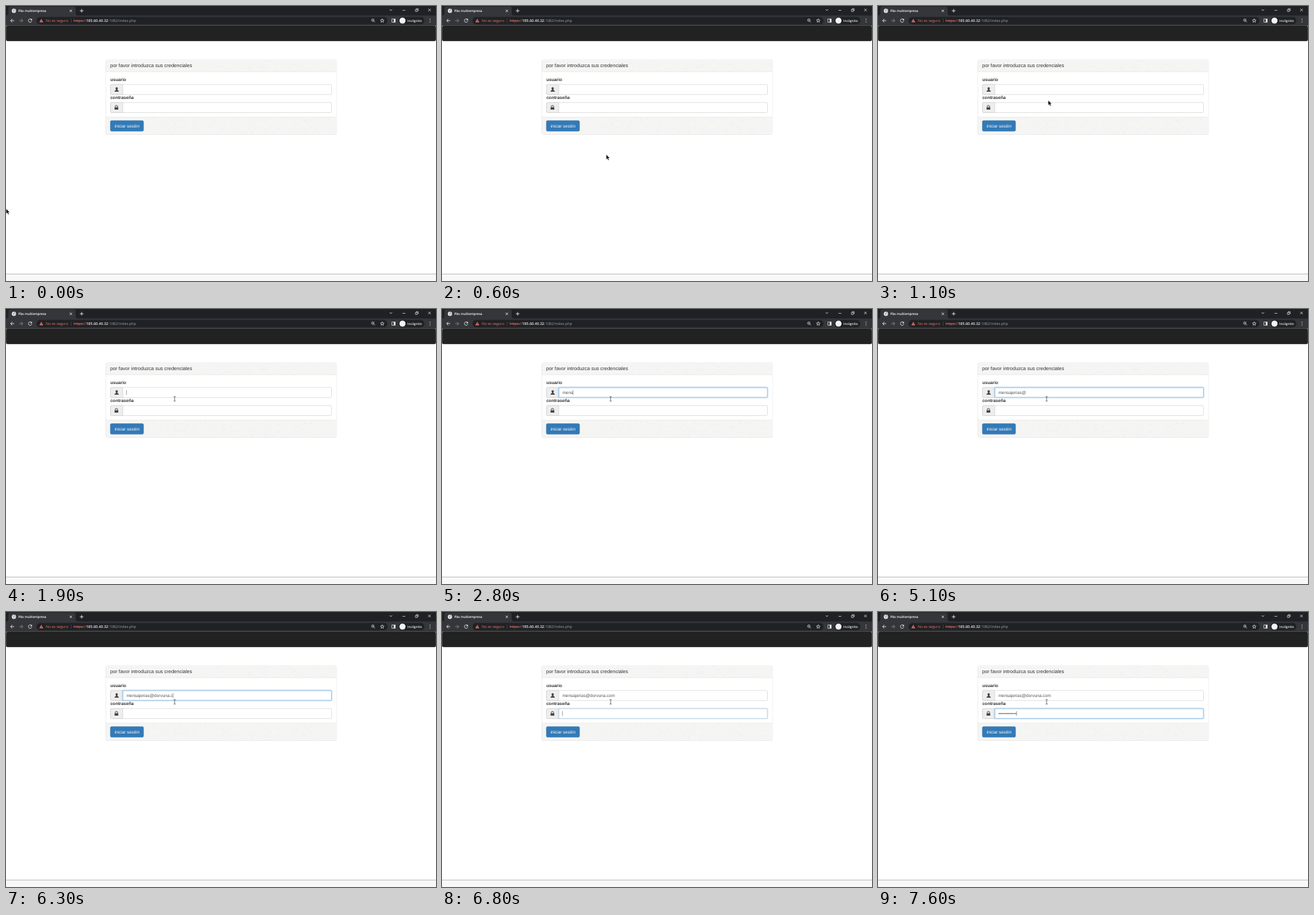
These frames come from a looping animation (648x414 px, 8 s). An HTML page:

```html
<!DOCTYPE html>
<html lang="es">
<head>
<meta charset="utf-8">
<title>Acceso</title>
<style>
  html, body { margin: 0; width: 100%; height: 100%; overflow: hidden; background: #fff; }
  svg { display: block; width: 100%; height: 100%; }
  text { font-family: "Liberation Sans", Arial, sans-serif; font-size: 6.5px; fill: #333; text-rendering: geometricPrecision; white-space: pre; }
  .ui text { font-family: "Open Sans", "Noto Sans", sans-serif; font-size: 5.55px; }
  .icon { fill: none; stroke: #e8eaed; stroke-width: .9; }
  .bold { font-weight: 700; }
  .value { fill: #555; }
</style>
</head>
<body>
<svg viewBox="0 0 648 414" xmlns="http://www.w3.org/2000/svg">
  <defs>
    <clipPath id="bands"><path d="M151 81.5h346.5v17.2H151zM151 167.5h346.5v25.5H151z"/></clipPath>
    <filter id="blur" x="-5%" y="-50%" width="110%" height="200%"><feGaussianBlur stdDeviation="1"/></filter>
    <g id="group">
      <rect x="157.5" width="333" height="15.2" y=".3" rx="1.8" fill="#fff" stroke="#ccc" stroke-width=".6"/>
      <path d="M176 .3h-16.700a1.800 1.800 0 0 0-1.800 1.800v11.600a1.800 1.800 0 0 0 1.800 1.800H176z" fill="#eee" stroke="#ccc" stroke-width=".6"/>
    </g>
  </defs>
  <rect width="648" height="414" fill="#fff"/>

  <g class="ui">
    <rect width="648" height="29.5" fill="#202124"/>
    <path d="M0 14.2C2.5 14.2 3.5 13 3.5 11V4Q3.5.8 7 .8h94.500Q105 .8 105 4v7c0 2 1 3.200 3.500 3.200H648v15.300H0z" fill="#35363a"/>
    <circle cx="12" cy="7.200" r="3.200" fill="#f1f3f4"/>
    <path d="M10 6l1.700 1.500-.5 1.700M12.500 4.600l-.4 1.300 2.200.7M13.400 9.200l.6-1.300" class="icon" style="stroke:#4a4b50;stroke-width:.7"/>
    <text x="18.500" y="9.100" style="font-size:4.8px;fill:#fff;font-weight:600">Pbx multiempresa</text>
    <path class="icon" d="M96 5.600l3.400 3.400m0-3.400L96 9M111.300 7.200h5.400m-2.700-2.700v5.400"/>
    <path class="icon" style="stroke-width:.7" d="M578 5l2 2 2-2M597.500 6.500h4.200M617 5.200h3v3h-3zM618.200 5v-1h3v3h-1M636.200 4l4 4m0-4l-4 4"/>

    <path class="icon" d="M12.300 22H7m2.500-2.600L6.900 22l2.600 2.600"/>
    <path class="icon" style="stroke:#85878b" d="M20 22h5.300m-2.500-2.600l2.600 2.600-2.600 2.600"/>
    <path class="icon" d="M38.300 20.200a2.600 2.600 0 1 0 .6 2.400"/>
    <path d="M39.200 18.800v2.800h-2.800z" fill="#e8eaed"/>
    <rect x="46" y="16.400" width="529" height="11.200" rx="5.600" fill="#202124"/>
    <path d="M53.200 19.200l3 5.300h-6z" fill="#e8736a"/>
    <path d="M53.200 21v1.700m0 .5v.7" stroke="#202124" stroke-width=".6"/>
    <text x="60" y="24" style="fill:#e8736a">No es seguro</text>
    <path d="M98.200 19v6" stroke="#5f6368" stroke-width=".5"/>
    <text x="102" y="24" style="fill:#9aa0a6"><tspan style="fill:#e8736a">https://</tspan><tspan style="fill:#e8eaed;font-weight:600">185.60.40.32</tspan>:1082/index.php</text>
    <path d="M102 22.300h14.800" stroke="#e8736a" stroke-width=".5"/>
    <g class="icon" style="stroke-width:.7">
      <circle cx="552.800" cy="21.300" r="1.900"/>
      <path d="M554.200 22.700l1.800 1.800M552 21.300h1.700M567 19.200l.8 1.900 2 .1-1.600 1.300.6 2-1.800-1.100-1.800 1.100.6-2-1.600-1.300 2-.1z"/>
      <path d="M581.500 19.500h5v5h-5z"/>
    </g>
    <path d="M584.300 19.500h2.400v5h-2.400z" fill="#e8eaed"/>
    <rect x="591.500" y="16.400" width="39" height="11.200" rx="5.600" fill="#202124"/>
    <circle cx="597.500" cy="22" r="4.600" fill="#f1f3f4"/>
    <text x="605" y="24" style="font-size:4.8px;fill:#f1f3f4;font-weight:600">Incógnito</text>
    <path d="M639 19.700h.01M639 22h.01M639 24.300h.01" stroke="#e8eaed" stroke-width="1.200" stroke-linecap="round"/>
  </g>

  <rect x=".3" y="30" width="647.400" height="22.500" rx="1.900" fill="#222" stroke="#101010" stroke-width=".6"/>
  <rect y="403.500" width="648" height="11" fill="#f8f8f8"/>
  <path d="M0 403.600h648" stroke="#aaa" stroke-width=".8"/>

  <rect x="150.500" y="81" width="347.500" height="112.500" rx="2" fill="#fff" stroke="#ddd" stroke-width=".6"/>
  <g clip-path="url(#bands)">
    <path d="M151 81h347v113H151z" fill="#f5f5f4"/>
    <path id="texture" fill="none" stroke="#ebebe9" stroke-width=".6"/>
  </g>
  <path d="M150.800 98.900h347v68.400h-347z" fill="#fff"/>
  <path d="M150.800 98.900h347M150.800 167.300h347" stroke="#ddd" stroke-width=".6"/>
  <text x="157" y="91.900" style="font-size:7.46px">por favor introduzca sus credenciales</text>
  <text class="bold" x="157.200" y="112.900" style="font-size:6.6px">usuario</text>
  <text class="bold" x="157.200" y="140.200" style="font-size:6.6px">contraseña</text>
  <use href="#group" y="117.800"/>
  <use href="#group" y="145"/>
  <path d="M166.800 122.300c1.100 0 1.700.8 1.700 1.800s-.4 1.700-.8 2.100c.1.700 2.300.9 2.300 2.200v.5h-6.400v-.5c0-1.300 2.200-1.500 2.300-2.200-.4-.4-.8-1.100-.8-2.100s.6-1.800 1.700-1.800z" fill="#444"/>
  <path d="M163.600 152.400h5.600v3.600h-5.600z" fill="#444"/>
  <path d="M164.700 152.400v-1.100a1.700 1.700 0 0 1 3.400 0v1.100" fill="none" stroke="#444" stroke-width="1"/>

  <g id="focus" fill="none" stroke="#66afe9">
    <rect x="175.800" y="118.100" width="314.900" height="15.200" rx="1.200" stroke-width="1.600" opacity=".3" filter="url(#blur)"/>
    <rect x="175.800" y="118.100" width="314.900" height="15.200" rx="1.200" stroke-width=".6" opacity=".85"/>
  </g>
  <text id="user" class="value" x="181.400" y="127.700"></text>
  <text id="pass" class="value" x="181.400" y="154.900"></text>
  <path id="caret" d="M0 0v7.200" stroke="#444" stroke-width=".5"/>

  <rect x="157.200" y="172.500" width="50.100" height="16" rx="1.900" fill="#337ab7" stroke="#2e6da4" stroke-width=".4"/>
  <text x="163.500" y="182.700" style="fill:#fff">iniciar sesión</text>

  <path id="arrow" d="M0 0v7.400l1.700-1.500 1.200 2.700 1.300-.6-1.200-2.600h2.300z" fill="#000" stroke="#fff" stroke-width=".4"/>
  <path id="beam" d="M-1.600-3.400h1.200l.4.400.4-.4h1.200M0-3v6M-1.600 3.400h1.200L0 3l.4.400h1.200" fill="none" stroke="#333" stroke-width=".7"/>
</svg>
<script>
const LOOP = 8000;
const EMAIL = "mensajerias@dorvuna.com";
const $ = id => document.getElementById(id);
const show = (el, on) => el.setAttribute("visibility", on ? "visible" : "hidden");
const place = (el, x, y) => el.setAttribute("transform", `translate(${x} ${y})`);

// [time, characters typed]
const typing = [[2500, 1], [2600, 2], [2800, 4], [3100, 5], [3400, 6], [3500, 8], [3600, 9],
  [3800, 10], [3900, 11], [4600, 12], [5300, 14], [5500, 15], [5600, 16], [5700, 17], [5800, 18],
  [6000, 19], [6100, 20], [6300, 21], [6500, 22], [6700, 23]];
// [time, x, y] of the pointer while it settles on the field
const settle = [[900, 264, 199], [1000, 260, 164], [1100, 256.5, 142], [1200, 255.5, 138.5],
  [1300, 255.3, 137.5], [1400, 255, 136.8], [1500, 254.6, 136.2], [1600, 254.3, 135.6], [1700, 254.1, 135.2]];
const FOCUS = 1900, NEXT = 6800, PASTE = 7600;

const latest = (list, t) => list.reduce((found, item) => item[0] <= t ? item : found, null);

function drawTexture() {
  let seed = 7;
  const rnd = () => (seed = seed * 16807 % 2147483647) / 2147483647;
  let d = "";
  for (let i = 0; i < 520; i++) {
    const x = 151 + rnd() * 346, y = i % 5 < 2 ? 81 + rnd() * 18 : 167 + rnd() * 26;
    const r = 1 + rnd() * 2, dx = (rnd() - .5) * 5, dy = (rnd() - .5) * 5;
    d += `M${x.toFixed(1)} ${y.toFixed(1)}a${r.toFixed(1)} ${r.toFixed(1)} 0 0 1 ${dx.toFixed(1)} ${dy.toFixed(1)}`;
  }
  $("texture").setAttribute("d", d);
}

// The pointer dips a little, then sweeps up to the form
function pointerAt(t) {
  const stop = latest(settle, t);
  if (stop) return [stop[1], stop[2]];
  const p = Math.min(Math.floor(t / 100) / 7, 1);
  const s = p * p * (3 - 2 * p);
  return [.3 + 261.7 * s, 305.3 - 99.3 * s + 28 * Math.sin(Math.PI * p)];
}

function render(t) {
  const [x, y] = pointerAt(t);
  const overText = t >= 1300;
  show($("arrow"), !overText);
  show($("beam"), overText);
  place($(overText ? "beam" : "arrow"), x, y);

  const key = latest(typing, t);
  const user = $("user"), pass = $("pass");
  user.textContent = EMAIL.slice(0, key ? key[1] : 0);
  pass.textContent = t >= PASTE ? "•".repeat(12) : "";

  const second = t >= NEXT;
  const focus = $("focus");
  focus.setAttribute("opacity", t < FOCUS + 100 ? 0 : second && t < NEXT + 100 ? .5 : 1);
  place(focus, 0, second ? 27.2 : 0);

  // The caret restarts its blink at every key press
  const since = t >= PASTE ? PASTE : second ? NEXT : key ? key[0] : FOCUS;
  const field = second ? pass : user;
  const width = field.textContent ? field.getComputedTextLength() : 0;
  show($("caret"), t >= FOCUS && Math.floor((t - since) / 500) % 2 === 0);
  place($("caret"), 181.6 + width, second ? 149.2 : 122);
}

drawTexture();
const start = performance.now();
function tick() {
  render((performance.now() - start) % LOOP);
  requestAnimationFrame(tick);
}
tick();
</script>
</body>
</html>
```
